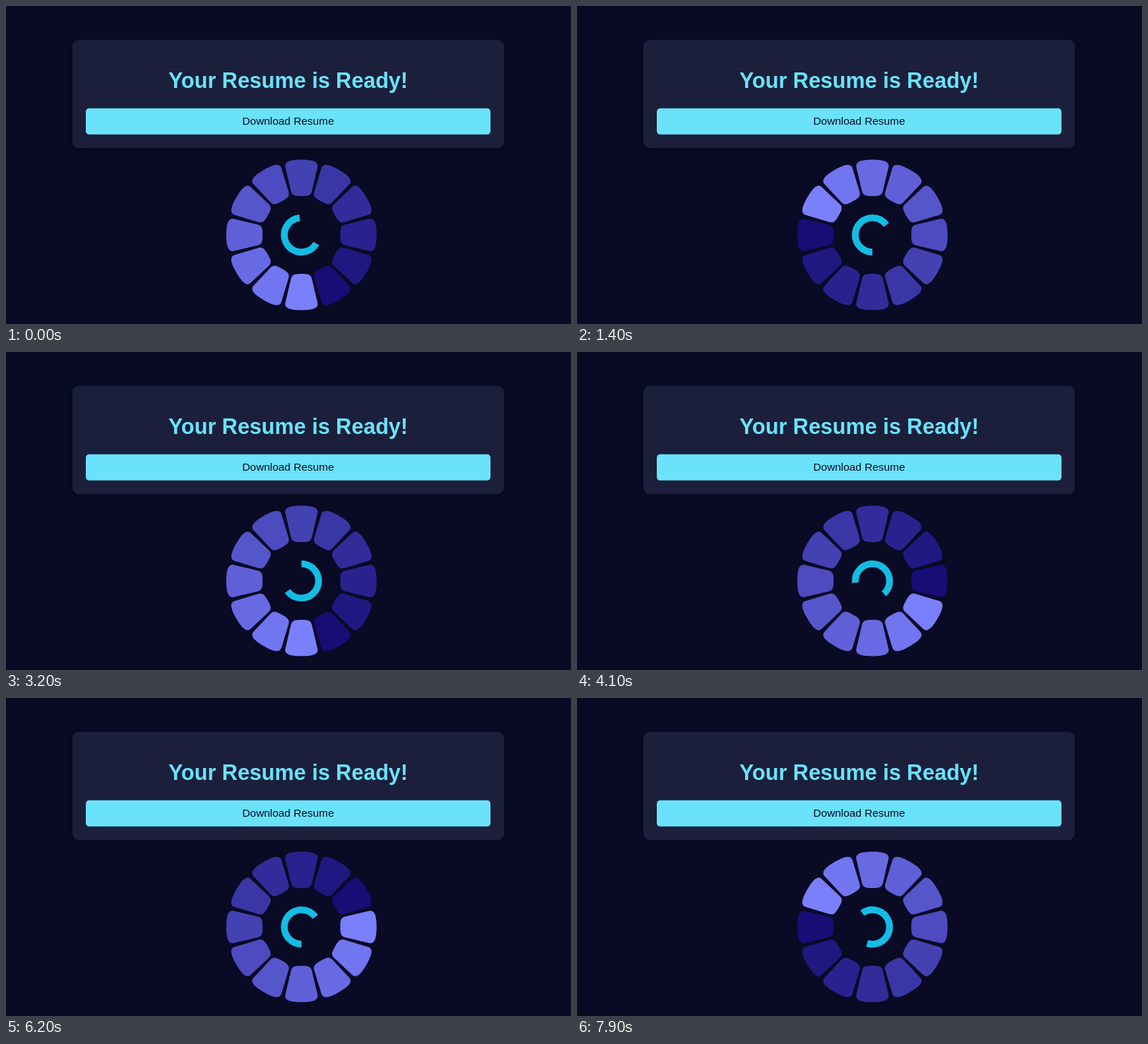
An HTML page for the animation above (8000 ms loop, 800 px wide and 450 px high).

```html
<!DOCTYPE html>
<html lang="en">
<head>
<meta charset="utf-8">
<title>Resume ready</title>
<style>
  html, body { margin: 0; width: 100%; height: 100%; overflow: hidden; background: #090a24; }
  svg { display: block; width: 800px; height: 450px; }
  text { font-family: "Liberation Sans", Arial, sans-serif; text-anchor: middle; }
  .card { fill: #1b1f3b; filter: drop-shadow(0 4px 4px rgba(0, 0, 0, .2)); }
  .title { font-size: 30.56px; font-weight: bold; fill: #6ae3fa; }
  .label { font-size: 15.4px; fill: #090a24; }
</style>
</head>
<body>
<svg viewBox="0 0 800 450">
  <rect class="card" x="94" y="47.7" width="611" height="153.5" rx="9.5"/>
  <text class="title" x="399.5" y="116">Your Resume is Ready!</text>
  <rect x="113" y="144.8" width="573" height="37" rx="4.8" fill="#6ae3fa"/>
  <text class="label" x="399.5" y="168">Download Resume</text>
  <g transform="translate(418.3 324)">
    <g id="wheel"></g>
    <circle id="arc" r="24.3" fill="none" stroke="#14bce4" stroke-width="9.6"
      pathLength="360" stroke-dasharray="234 126"/>
  </g>
</svg>
<script>
  const LOOP = 8000, FRAME = 100, COUNT = 12;
  const BRIGHT = [122, 127, 252], DARK = [23, 13, 117];
  const PETAL = 'M-22.8-96C-24.6-104-15-106.4 0-106.4S24.6-104 22.8-96' +
    'L14.8-62C13.2-55.6 9-55 0-55S-13.2-55.6-14.8-62Z';

  const wheel = document.getElementById('wheel');
  const arc = document.getElementById('arc');

  const petals = Array.from({ length: COUNT }, (_, i) => {
    const p = document.createElementNS('http://www.w3.org/2000/svg', 'path');
    p.setAttribute('d', PETAL);
    p.setAttribute('transform', `rotate(${i * 360 / COUNT})`);
    return wheel.appendChild(p);
  });

  const shade = k =>
    `rgb(${BRIGHT.map((b, i) => Math.round(b + (DARK[i] - b) * k))})`;

  function draw(now) {
    // Both spinners step at their own rate and are sampled every 100 ms.
    const t = Math.floor(now % LOOP / FRAME) * FRAME;
    const head = 6 + Math.floor(t * 0.011106 + 0.7);
    const turn = Math.floor(t * 0.02499 + 0.532);
    petals.forEach((p, i) => {
      const behind = ((i - head) % COUNT + COUNT) % COUNT;
      p.setAttribute('fill', shade(behind / (COUNT - 1)));
    });
    arc.setAttribute('transform', `rotate(${30 + turn * 12})`);
  }

  const start = performance.now();
  function tick() {
    draw(performance.now() - start);
    requestAnimationFrame(tick);
  }
  tick();
</script>
</body>
</html>
```
